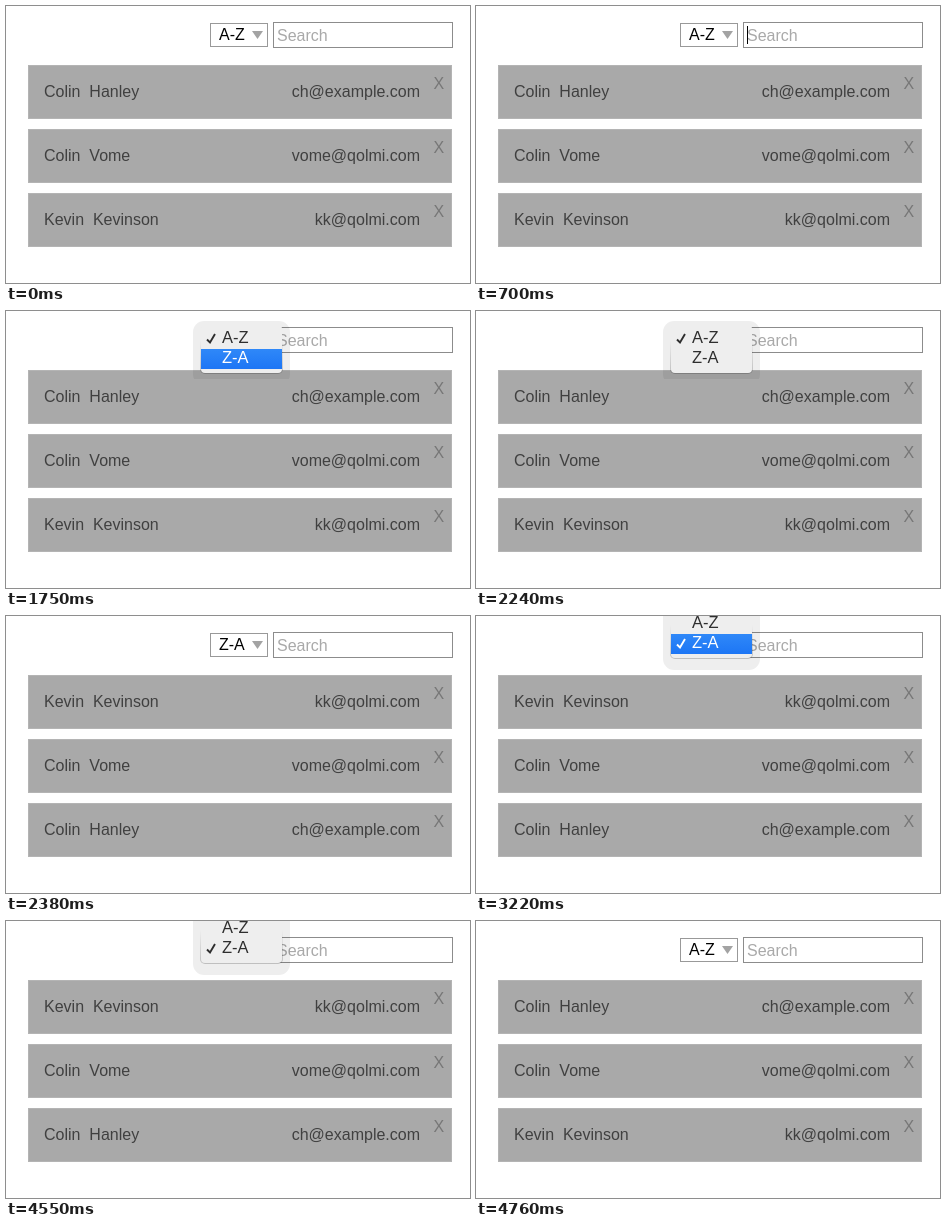
An HTML page with a canvas that plays this animation: 464x277 px, repeating every 5530 ms.

```html
<!DOCTYPE html>
<html lang="en">
<head>
<meta charset="utf-8">
<title>Sorted contact list</title>
<style>
html, body { margin: 0; width: 100%; height: 100%; overflow: hidden; background: #fff; }
canvas { display: block; width: 464px; height: 277px; }
</style>
</head>
<body>
<canvas id="stage"></canvas>
<script>
const W = 464, H = 277, LOOP = 5530;
const FONT = '"Liberation Sans", Arial, sans-serif';
const canvas = document.getElementById('stage');
const ctx = canvas.getContext('2d');
const ratio = window.devicePixelRatio || 1;
canvas.width = W * ratio;
canvas.height = H * ratio;

const people = [
  ['Colin', 'Hanley', 'ch@example.com'],
  ['Colin', 'Vome', 'vome@qolmi.com'],
  ['Kevin', 'Kevinson', 'kk@qolmi.com']
];
const options = ['A-Z', 'Z-A'];

// Each step: start time, chosen order, menu open, highlighted option (-1: none), caret
const steps = [
  { at: 0, order: 0 },
  { at: 700, order: 0, caret: true },
  { at: 1190, order: 0 },
  { at: 1330, order: 0, open: true, hot: 0 },
  { at: 1750, order: 0, open: true, hot: 1 },
  { at: 2100, order: 0, open: true, hot: -1 },
  { at: 2170, order: 0, open: true, hot: 1 },
  { at: 2240, order: 0, open: true, hot: -1 },
  { at: 2310, order: 0, open: true, hot: 1 },
  { at: 2380, order: 1 },
  { at: 3220, order: 1, open: true, hot: 1 },
  { at: 3850, order: 1, open: true, hot: 0 },
  { at: 4550, order: 1, open: true, hot: -1 },
  { at: 4620, order: 1, open: true, hot: 0 },
  { at: 4690, order: 1, open: true, hot: -1 },
  { at: 4760, order: 0 }
];

function rect(x, y, w, h, color) {
  ctx.fillStyle = color;
  ctx.fillRect(x, y, w, h);
}

function frame(x, y, w, h, color) {
  ctx.strokeStyle = color;
  ctx.lineWidth = 1;
  ctx.strokeRect(x + 0.5, y + 0.5, w - 1, h - 1);
}

function rounded(x, y, w, h, r, color) {
  ctx.fillStyle = color;
  ctx.beginPath();
  ctx.roundRect(x, y, w, h, r);
  ctx.fill();
}

function text(str, x, y, color, align = 'left', size = 16) {
  ctx.font = `${size}px ${FONT}`;
  ctx.textAlign = align;
  ctx.fillStyle = color;
  ctx.fillText(str, x, y);
}

function drawHeader(order, caret) {
  frame(204, 17, 58, 24, '#999');
  text(options[order], 213, 34, '#000');
  ctx.fillStyle = '#a3a3a3';
  ctx.beginPath();
  ctx.moveTo(246, 25);
  ctx.lineTo(257, 25);
  ctx.lineTo(251.5, 33);
  ctx.fill();

  frame(267, 16, 180, 26, '#8c8c8c');
  text('Search', 271, 35, '#a9a9a9');
  if (caret) rect(271, 20, 1, 18, '#000');
}

function drawList(order) {
  const rows = order ? [...people].reverse() : people;
  rows.forEach(([first, last, mail], i) => {
    const y = 59 + i * 64;
    rect(22, y, 424, 54, '#a9a9a9');
    frame(22, y, 424, 54, '#b4b4b4');
    text(`${first}  ${last}`, 38, y + 32, '#404040');
    text(mail, 414, y + 32, '#404040', 'right');
    text('X', 427.5, y + 24, '#777');
  });
}

function drawCheck(y, color) {
  ctx.strokeStyle = color;
  ctx.lineWidth = 1.9;
  ctx.beginPath();
  ctx.moveTo(201, y + 10.5);
  ctx.lineTo(204, y + 13.5);
  ctx.lineTo(209, y + 5);
  ctx.stroke();
}

function drawMenu(order, hot) {
  // The chosen option always lies over the closed control
  const top = 14 - order * 20;

  ctx.save();
  ctx.beginPath();
  ctx.rect(0, 0, W, 68);
  ctx.clip();
  rounded(187, top - 4, 97, 64, 11, 'rgba(0,0,0,0.065)');
  ctx.restore();

  const edge = ctx.createLinearGradient(0, top, 0, top + 49);
  edge.addColorStop(0.3, 'rgba(0,0,0,0)');
  edge.addColorStop(1, 'rgba(0,0,0,0.2)');
  rounded(194, top, 83, 49, 5, edge);
  rounded(195, top, 81, 48, 4, '#eee');

  options.forEach((label, i) => {
    const y = top + 4 + i * 20;
    const active = i === hot;
    if (active) {
      const blue = ctx.createLinearGradient(0, y, 0, y + 20);
      blue.addColorStop(0, '#2f88f8');
      blue.addColorStop(1, '#1d76f5');
      rect(195, y, 81, 20, blue);
    }
    const color = active ? '#fff' : '#2e2e2e';
    if (i === order) drawCheck(y, color);
    text(label, 216, y + 14, color, 'left', 16.5);
  });
}

function draw(time) {
  const step = steps.findLast(s => s.at <= time);
  ctx.setTransform(ratio, 0, 0, ratio, 0, 0);
  rect(0, 0, W, H, '#fff');
  drawHeader(step.order, step.caret);
  drawList(step.order);
  if (step.open) drawMenu(step.order, step.hot);
}

const start = performance.now();
function tick() {
  draw((performance.now() - start) % LOOP);
  requestAnimationFrame(tick);
}
tick();
</script>
</body>
</html>
```
